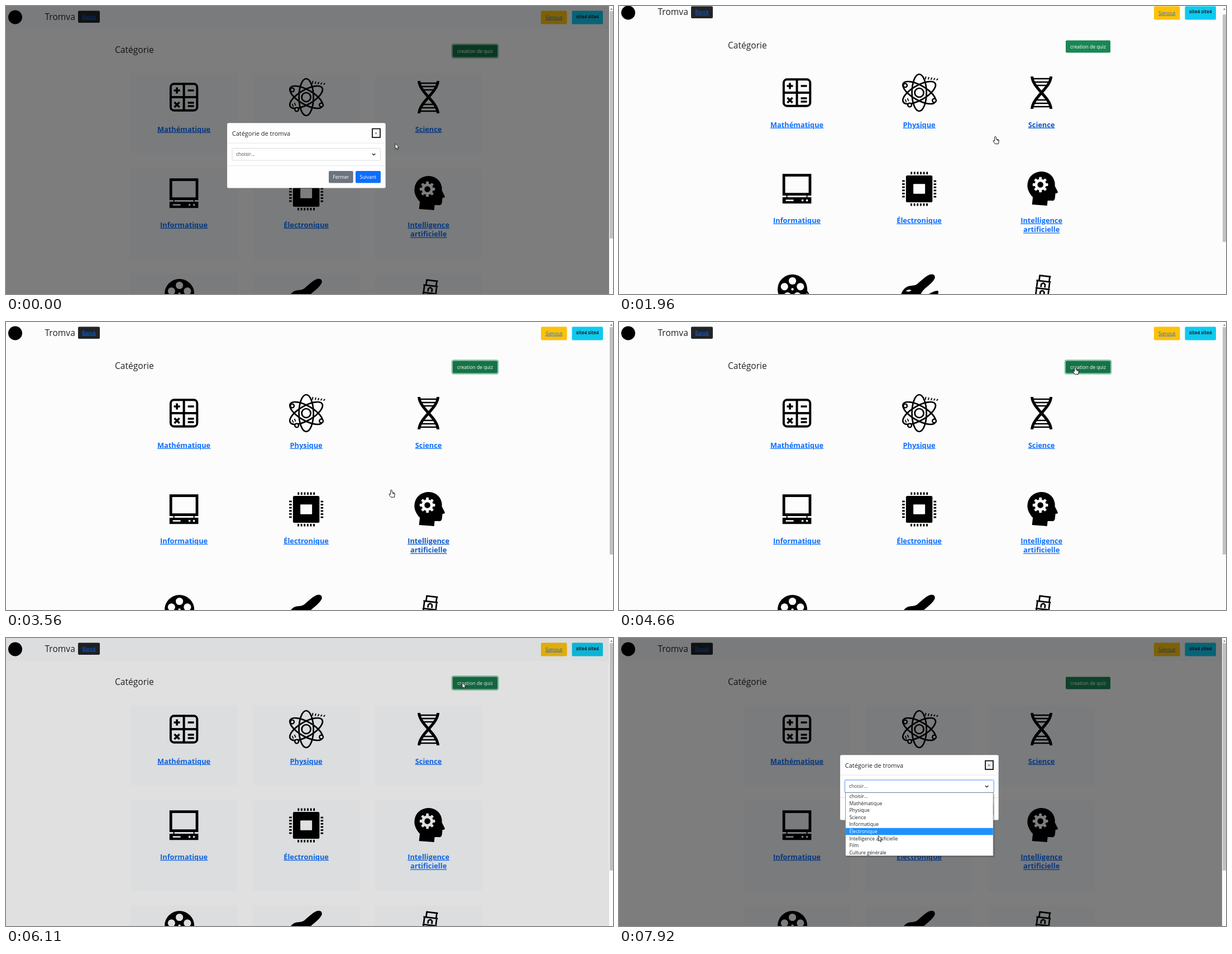
Write an HTML page that moves like this. It is 1087x515 px and loops after 8 s.

```html
<!DOCTYPE html>
<html lang="fr">
<head>
<meta charset="utf-8">
<title>Catégories</title>
<style>
html, body { margin: 0; width: 100%; height: 100%; overflow: hidden; background: #fcfcfc; }
svg { display: block; width: 100vw; height: 100vh; }
text { font: 8.6px "Open Sans", "Noto Sans", sans-serif; fill: #212529; }
.mid { text-anchor: middle; }
.link { text-decoration: underline; fill: #0d6efd; }
.h3 { font-size: 15.6px; }
.label { font-size: 12.8px; font-weight: 700; text-anchor: middle; }
.label.on { fill: #0a58ca; }
.light { fill: #fff; }
.line { fill: none; stroke: #000; }
.hole { fill: #fcfcfc; }
</style>
</head>
<body>
<svg viewBox="0 0 1087 515">
  <rect width="1087" height="515" fill="#fcfcfc"/>
  <g id="page">
    <rect id="nav" y="-10" width="1080" height="51" fill="#f6f8f9"/>
    <circle cx="16.5" cy="20" r="12.5"/>
    <text class="h3" x="69.5" y="24.5">Tromva</text>
    <rect x="129" y="8.5" width="39" height="21.5" rx="2" fill="#212529"/>
    <text class="mid link" x="148.7" y="22.5">Banck</text>
    <rect x="958" y="8.5" width="46.5" height="24" rx="2" fill="#ffc107"/>
    <text class="mid link" x="981.3" y="23.7">Signout</text>
    <rect x="1013.5" y="8.5" width="55.5" height="24" rx="2" fill="#0dcaf0"/>
    <text class="mid" x="1041.3" y="21.5" style="font-size:8px;font-weight:700">site4 site4</text>
    <text class="h3" x="195" y="84.3">Catégorie</text>
    <rect id="ring" x="798.8" y="68.3" width="82.4" height="24.4" rx="3" fill="none" stroke="#198754" stroke-opacity=".5" stroke-width="2.3"/>
    <rect id="make" x="800" y="69.5" width="80" height="22" rx="2"/>
    <text class="mid light" x="840" y="83.8">creation de quiz</text>
    <g id="cards"></g>
  </g>
  <rect id="dim" width="1080" height="515"/>
  <g id="bar">
    <rect x="1080" width="7" height="515" fill="#fcfcfc"/>
    <path d="M1082 6.5L1084 4L1086 6.5Z" fill="#606060"/>
    <rect id="thumb" x="1081" width="6" height="406.5" fill="#c1c1c1"/>
  </g>
  <g id="modal">
    <rect x="396" y="209.3" width="283.7" height="116.2" rx="2.5" fill="#fefefe"/>
    <path d="M396 245.2H679.7M396 285.5H679.7" stroke="#dee2e6" stroke-width=".8"/>
    <text x="404.7" y="231.6" style="font-size:11px;font-weight:500">Catégorie de tromva</text>
    <rect id="close" x="656" y="219.5" width="14" height="15.5" stroke="#101010" stroke-width="1.8"/>
    <path d="M661.1 226.2l3 3m0-3l-3 3" stroke="#222" stroke-width=".8"/>
    <rect id="halo" x="403.9" y="253.4" width="267.7" height="23.8" rx="3" fill="none" stroke="#0d6efd" stroke-opacity=".25" stroke-width="2.3"/>
    <rect id="field" x="405" y="254.5" width="265.5" height="21.6" rx="2" fill="#fff" stroke-width=".8"/>
    <text x="412" y="268.4" fill-opacity=".85">choisir...</text>
    <path d="M655.8 263.8l2.8 2.8l2.8-2.8" class="line" stroke-width="1.2"/>
    <rect x="578" y="295" width="43.7" height="21.6" rx="2" fill="#6c757d"/>
    <text class="mid light" x="599.8" y="308.9">Fermer</text>
    <rect x="626" y="295" width="45" height="21.6" rx="2" fill="#0d6efd"/>
    <text class="mid light" x="648.3" y="308.9">Suivant</text>
  </g>
  <g id="list">
    <rect x="407" y="279" width="265.5" height="113" rx="1" opacity=".18"/>
    <rect x="405.4" y="276.6" width="264.8" height="113" fill="#fff" stroke="#767676" stroke-width=".8"/>
    <rect id="pick" x="405.8" width="264" height="12.55" fill="#1e90ff"/>
    <g id="options"></g>
  </g>
  <g id="cursor">
    <path id="arrow" fill="#fff" stroke="#000" stroke-width=".8" d="M0 0V9.6L2.2 7.6L3.8 11.2L5.3 10.5L3.8 7.1H6.8Z"/>
    <path id="hand" fill="#fff" stroke="#000" stroke-width=".9" stroke-linejoin="round" d="M-1.3 1.2Q0-.6 1.3 1.2V5L5 5.8Q6.5 6.2 6.3 8L5.5 13.5H-.5L-3.8 9Q-4.3 7.4-2.6 7.5L-1.3 8.6ZM3.2 5.5V8M5 6V8"/>
  </g>
</svg>
<script>
const $ = id => document.getElementById(id);
const each = (n, f) => Array.from({ length: n }, (_, i) => f(i)).join('');
const rect = (x, y, w, h, more = '') => `<rect x="${x}" y="${y}" width="${w}" height="${h}" ${more}/>`;
const dot = (x, y, r, more = '') => `<circle cx="${x}" cy="${y}" r="${r}" ${more}/>`;
const path = (d, w) => w
  ? `<path class="line" stroke-width="${w}" d="${d}"/>`
  : `<path d="${d}"/>`;

// Icons are drawn around their own centre.
function calculator() {
  return rect(-23.7, -23.7, 47.4, 47.4, 'rx="6" class="line" stroke-width="4"')
    + path('M0-24V24M-24 0H24', 4)
    + path('M-18-12H-7M-12.5-17.5V-6.5M7-12H18M7 10H18M7 16H18M-17 9l9 9m0-9l-9 9', 3.6);
}
function atom() {
  const ticks = each(5, i => path(`M${11 + i * 5}-${24 - i * .4}l${1 + i * .4}-${5 - i * .6}`, 1.8));
  const electrons = [[27, 14], [-17, 22], [-25, -13]]
    .map(([x, y]) => dot(x, y, 3.4, 'class="hole" stroke="#000" stroke-width="2.4"')).join('');
  return each(3, i => `<ellipse rx="13" ry="33" class="line" stroke-width="2.7" transform="rotate(${i * 60})"/>`)
    + dot(0, 0, 8, 'class="line" stroke-width="2.7"') + electrons + ticks
    + path('M-25 12l2 5M-21 10l2 5', 1.8);
}
function dna() {
  return path('M-17-29C-16-8 16 8 17 29M17-29C16-8-16 8-17 29', 5)
    + path('M-15-25H15M-14-19H14M-10-13H10M-10 13H10M-14 19H14M-15 25H15', 2.6);
}
function computer() {
  return rect(-23.4, -24.4, 46.8, 34, 'class="line" stroke-width="4.8"')
    + rect(-25.8, 15, 51.6, 11.2)
    + path('M-18 12V16M18 12V16', 2)
    + rect(-20, 19.3, 14, 2.6, 'class="hole"')
    + dot(10, 20.6, 1.9, 'class="hole"') + dot(18, 20.6, 1.9, 'class="hole"');
}
function chip() {
  const pins = each(4, s => `<g transform="rotate(${s * 90})">`
    + each(6, i => rect(-15.3 + i * 5.6, -30.5, 2.8, 4.6)) + '</g>');
  return rect(-23.7, -24, 47.4, 48, 'rx="2.5"') + rect(-10.5, -8.7, 21, 17.4, 'rx="1" class="hole"') + pins;
}
function head() {
  const teeth = each(8, i => rect(-2.4, -13.8, 4.8, 6, `rx="1" class="hole" transform="rotate(${i * 45})"`));
  return path('M-17 28L-15.500 15C-24 6-26-3-25-9C-23-25-10-31 0-31C15-31 23-20 24-10V-5L29 5Q30 8 25 8L24 17Q23 22 18 21H11L10 30Z')
    + `<g transform="translate(-2 -7.5)">${teeth}${dot(0, 0, 7.8, 'fill="none" stroke="#fcfcfc" stroke-width="5"')}</g>`;
}
function reel() {
  const holes = each(5, i => {
    const a = (i * 72 - 90) * Math.PI / 180;
    return dot(-8 + 15 * Math.cos(a), -8 + 15 * Math.sin(a), 6.6, 'class="hole"');
  });
  return dot(-8, -8, 26.5) + holes + dot(-8, -8, 2.2, 'class="hole"')
    + path('M17-5C24 4 23 12 24 20C25 29 28 33 34.500 33.500', 2.6);
}
function croc() {
  return path('M-31 33C-36 15-36-2-24-11C-18-16-10-13-4-17C4-24 10-30 18-34C24-36 29-34 28-28C26-22 16-14 8-7C4-3 2 2 1 7L20-1C26-4 30-6 34-5C36 2 28 12 18 15C6 18-2 22-6 34Z')
    + `<path class="hole" d="M-24-5Q-18-9-14-6Q-18-2-24-5ZM9-8l1 5l4-9ZM16-13l1 5l4-9ZM10 4l-2-5l5 3ZM18 0l-2-5l5 3Z"/>`;
}
function tower() {
  const floors = each(4, i => {
    const y = 18 - i * 13.5;
    return path(`M-13 ${y}H13M-11 ${y + 12}V${y}M11 ${y + 12}V${y}M-3.500 ${y + 11}V${y + 6}Q0 ${y + 1} 3.500 ${y + 6}V${y + 11}`, 2.7);
  });
  return `<g transform="translate(1 0) rotate(7)">${floors}${path('M-9-32H12M-8-32V-23M10-32V-23', 2.7)}</g>`
    + path('M-17 32H31.500', 2.8) + dot(-32, 32, 1.5) + path('M-27 32H-21', 2.8);
}

const cols = [223, 442, 661];
const rows = [[120.5, 143.5, 163, 224.6], [291, 161, 335, 395.8], [478.5, 161, 522.5, 584]];
const cards = [
  ['Mathématique', calculator], ['Physique', atom], ['Science', dna],
  ['Informatique', computer], ['Électronique', chip], ['Intelligence|artificielle', head],
  ['Film', reel], ['Animaux', croc], ['Culture générale', tower]
];
$('cards').innerHTML = cards.map(([name, icon], i) => {
  const x = cols[i % 3], [top, h, mid, base] = rows[i / 3 | 0], cx = x + 95.6;
  return rect(x, top, 191.5, h, 'class="card" fill="#f6f8f9"')
    + `<g transform="translate(${cx} ${mid})">${icon()}</g>`
    + '<g class="name">' + name.split('|').map((s, k) =>
      `<text class="label link" x="${cx}" y="${base + k * 16.6}">${s}</text>`).join('') + '</g>';
}).join('');
const cardBoxes = [...document.querySelectorAll('.card')];
const names = [...document.querySelectorAll('.name')];

const PITCH = 12.55, LIST_TOP = 277;
$('options').innerHTML = ['choisir...', ...cards.map(c => c[0].replace('|', ' ')).filter(s => s !== 'Animaux')]
  .map((s, i) => `<text x="412.4" y="${LIST_TOP + 9.2 + i * PITCH}">${s}</text>`).join('');
const options = [...$('options').children];

// The screen refreshes in bursts: [first, last, count].
const bursts = [
  [0, 0, 1], [120, 1110, 8], [1230, 1650, 4], [1800, 1800, 1], [1960, 2240, 3], [2520, 2770, 3],
  [2890, 2890, 1], [3290, 4280, 8], [4400, 4660, 3], [5990, 6110, 2], [6230, 7010, 7], [7130, 7920, 6]
];
function snap(t) {
  const [a, b, n] = bursts.filter(k => k[0] <= t).pop();
  if (n < 2) return a;
  const gap = (b - a) / (n - 1);
  return a + Math.min(n - 1, Math.floor((t - a) / gap + 1e-6)) * gap;
}

const scrollKeys = [[1800, 0], [1960, 8], [2100, 80], [2240, 115], [2520, 112], [2650, 100], [2770, 73], [2890, 0]];
const dimKeys = [[1650, .5], [1800, .3], [1960, 0], [5990, 0], [6110, .11], [6230, .5]];
const modalKeys = [[1630, 1], [1650, .94], [1800, 0], [6230, 0], [6360, .7], [6490, 1]];
const liftKeys = [[1630, 0], [1650, -2.5], [1800, -24], [6230, -28], [6360, -12], [6490, -3], [6620, 0]];
const cursorKeys = [
  [0, 697, 246], [400, 620, 272], [550, 583, 275], [830, 600, 262], [1110, 655, 235], [1510, 671, 225],
  [1650, 671, 225], [1960, 674, 233], [2240, 668, 245], [3290, 672, 255], [3432, 690, 300], [3715, 655, 262],
  [3856, 625, 215], [3998, 660, 165], [4280, 808, 89], [4660, 817, 80], [6360, 817, 80],
  [6750, 610, 210], [7010, 500, 262], [7290, 478, 268], [7920, 464.5, 353.5]
];
function at(keys, t, c = 1) {
  const i = keys.findIndex(k => k[0] > t);
  if (i < 0) return keys[keys.length - 1][c];
  if (!i) return keys[0][c];
  const a = keys[i - 1], b = keys[i];
  return a[c] + (b[c] - a[c]) * (t - a[0]) / (b[0] - a[0]);
}

const set = (el, o) => { for (const k in o) el.setAttribute(k, o[k]); };
const show = (el, on) => set(el, { visibility: on ? 'visible' : 'hidden' });

function draw(time) {
  const t = snap(time) + .01;
  const scroll = at(scrollKeys, t), dim = at(dimKeys, t), modal = at(modalKeys, t);
  const x = at(cursorKeys, t, 1), y = at(cursorKeys, t, 2);

  set($('page'), { transform: `translate(0 ${-scroll})` });
  set($('thumb'), { y: 9.2 + scroll * .76 });
  set($('dim'), { opacity: dim });
  const tint = Math.min(1, dim * 10);
  set($('nav'), { opacity: tint });

  const free = dim < .01;
  cardBoxes.forEach((box, i) => {
    set(box, { opacity: tint });
    const cx = cols[i % 3], [top, h] = rows[i / 3 | 0], py = y + scroll;
    const on = free && x > cx && x < cx + 191.5 && py > top && py < top + h;
    for (const label of names[i].children) label.classList.toggle('on', on);
  });

  const focus = t < 120 || (t > 2100 && t < 6620);
  show($('ring'), focus);
  set($('make'), { fill: focus ? '#157347' : '#198754' });

  set($('modal'), { opacity: modal, transform: `translate(0 ${at(liftKeys, t)})` });
  set($('close'), { fill: t > 1110 && t < 1900 ? '#dcdcdc' : t > 7000 ? '#efefef' : '#fcfcfc' });
  const active = t > 7130, open = t > 7280;
  show($('halo'), active);
  set($('field'), { stroke: active ? '#86b7fe' : '#ced4da' });

  show($('list'), open);
  const row = Math.max(0, Math.floor((y - 4 - LIST_TOP) / PITCH));
  set($('pick'), { y: LIST_TOP + row * PITCH });
  options.forEach((o, i) => o.classList.toggle('light', i === row));

  set($('cursor'), { transform: `translate(${x} ${y})` });
  const hand = t > 1110 && t < 5990;
  show($('hand'), hand);
  show($('arrow'), !hand);
}

const start = performance.now();
function tick() {
  draw((performance.now() - start) % 8000);
  requestAnimationFrame(tick);
}
tick();
</script>
</body>
</html>
```
